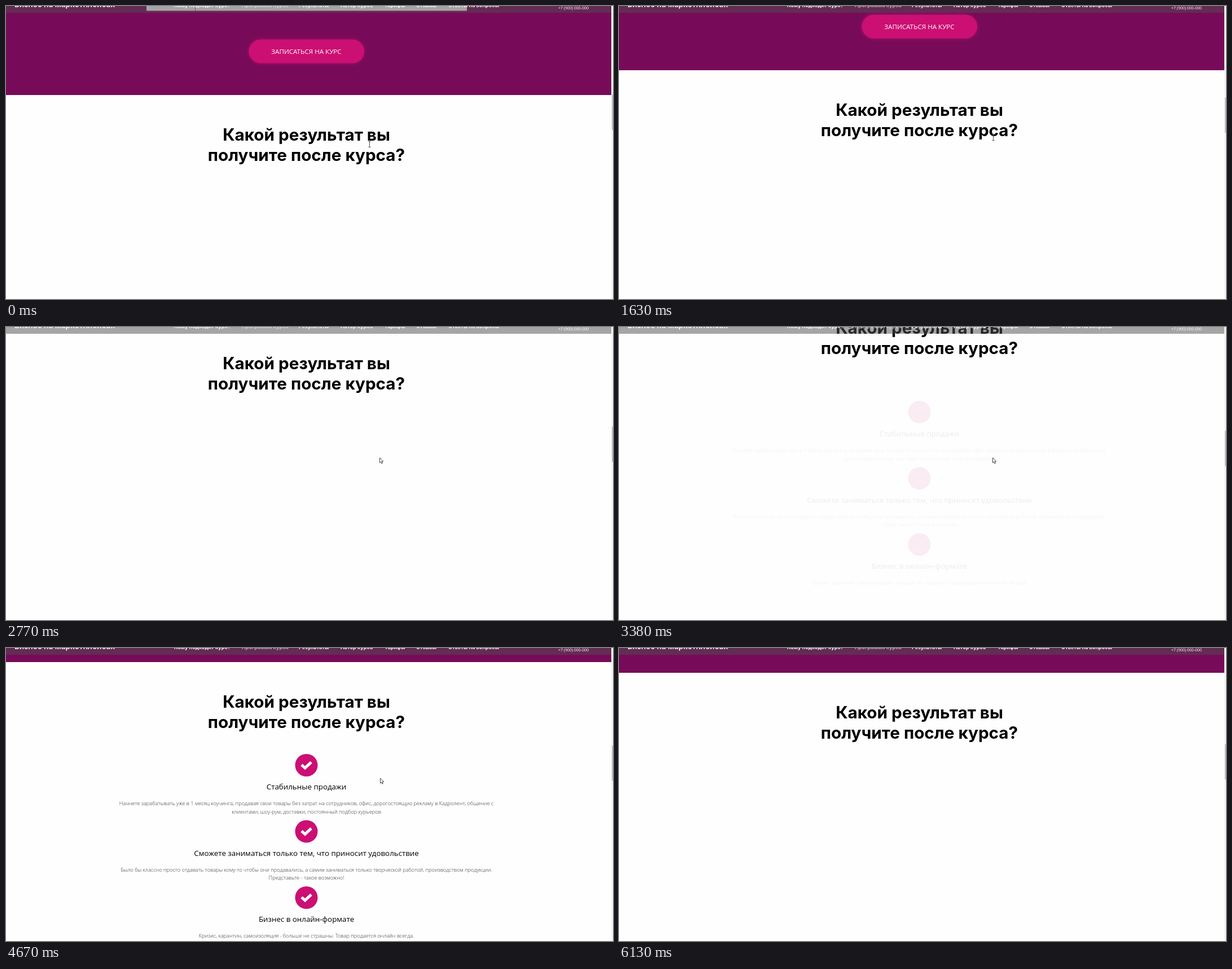
Write an HTML page with a canvas that moves like this. It is 1076x520 px and loops after 6.43 s.

```html
<!DOCTYPE html>
<html lang="ru">
<head>
<meta charset="utf-8">
<style>
  html, body { margin: 0; width: 100%; height: 100%; overflow: hidden; background: #fefefe; }
  canvas { display: block; }
</style>
</head>
<body>
<canvas id="stage" width="1076" height="520"></canvas>
<script>
const ctx = document.getElementById('stage').getContext('2d');
const WIDTH = 1076, HEIGHT = 520, PAGE_WIDTH = 1073, CENTER = 532.5, LOOP = 6430;
const PURPLE = '#780b59', PINK = '#cc0f73';
const SANS = "'Open Sans', 'Noto Sans', sans-serif";
const INTER = "Inter, 'Noto Sans', sans-serif";

// [time, page offset]: wheel notches of about 57 px, each easing out
const SCROLL = [
  [0, 0], [1630, 44], [1780, 57], [2070, 72], [2190, 103], [2340, 113], [2620, 114],
  [2770, 164], [2920, 171], [3230, 218], [3380, 227],
  [4090, 184], [4220, 171], [4670, 133], [4800, 114]
];

// [time, downward shift]: cards fade as they move away from their place
const FADE_DISTANCE = 40;
const CARD_SHIFT = [
  [0, 40], [3380, 37], [3530, 14], [3650, 3.5], [3790, 0.5], [3940, 0],
  [4800, 6.5], [4950, 18], [5080, 33], [5210, 40]
];

// [time, shape, x, y]
const CURSOR = [
  [0, drawBeam, 644.5, 245.5], [450, drawBeam, 646.5, 245.5],
  [590, drawBeam, 659.5, 236.5], [730, drawBeam, 663.5, 233.5],
  [2070, drawArrow, 662.5, 232], [4670, drawArrow, 663.5, 231],
  [5520, drawArrow, 692.5, 242], [5670, null],
  [5820, drawArrow, 1071.5, 508], [5980, drawArrow, 1060.5, 513], [6130, null]
];

const MENU = [
  ['Кому подходит курс?', 298], ['Программа курса', 418], ['Результаты', 519],
  ['Автор курса', 593], ['Тарифы', 671], ['Отзывы', 727], ['Ответы на вопросы', 784]
];

const CARDS = [
  ['Стабильные продажи',
    'Начнете зарабатывать уже в 1 месяц коучинга, продавая свои товары без затрат на сотрудников, офис, дорогостоящую рекламу в Кадролент, общение с',
    'клиентами, шоу-рум, доставки, постоянный подбор курьеров'],
  ['Сможете заниматься только тем, что приносит удовольствие',
    'Было бы классно просто отдавать товары кому-то чтобы они продавались, а самим заниматься только творческой работой, производством продукции.',
    'Представьте - такое возможно!'],
  ['Бизнес в онлайн-формате',
    'Кризис, карантин, самоизоляция - больше не страшны. Товар продается онлайн всегда.']
];

function stepAt(keys, time) {
  let current = keys[0];
  for (const key of keys) if (key[0] <= time) current = key;
  return current;
}

function rect(x, y, w, h, color) {
  ctx.fillStyle = color;
  ctx.fillRect(x, y, w, h);
}

function text(str, x, y, font, color, align = 'center') {
  ctx.font = font;
  ctx.fillStyle = color;
  ctx.textAlign = align;
  ctx.fillText(str, x, y);
}

function polyline(points) {
  ctx.beginPath();
  points.forEach(([x, y]) => ctx.lineTo(x, y));
}

function drawOffer() {
  rect(0, -300, PAGE_WIDTH, 458, PURPLE);
  rect(249, -300, 568, 308.5, '#fefefe');
  rect(335, -300, 1, 308.5, '#d8283c');
  ctx.save();
  ctx.shadowColor = 'rgba(204, 15, 115, .7)';
  ctx.shadowBlur = 6;
  ctx.fillStyle = PINK;
  ctx.beginPath();
  ctx.roundRect(430.5, 59.5, 204.5, 42, 21);
  ctx.fill();
  ctx.restore();
  text('ЗАПИСАТЬСЯ НА КУРС', CENTER, 85, `11.6px ${SANS}`, '#fff');
}

function drawHeading() {
  const font = `700 29.7px ${INTER}`;
  text('Какой результат вы', CENTER, 239, font, '#000');
  text('получите после курса?', CENTER, 275, font, '#000');
}

function drawCard([title, ...lines], y) {
  ctx.save();
  ctx.translate(CENTER, y);
  ctx.fillStyle = PINK;
  ctx.beginPath();
  ctx.arc(0, 0, 20, 0, Math.PI * 2);
  ctx.fill();
  polyline([[-8.6, -0.6], [-2.4, 4.8], [8.6, -5.4]]);
  ctx.strokeStyle = '#fff';
  ctx.lineWidth = 5;
  ctx.stroke();
  text(title, 0, 43, `13.35px ${SANS}`, '#000');
  lines.forEach((line, i) => text(line, 0, 71.3 + i * 14.2, `300 9.23px ${SANS}`, '#333'));
  ctx.restore();
}

function drawHeader() {
  rect(0, 0, PAGE_WIDTH, 12, 'rgba(78, 78, 78, .5)');
  text('Бизнес на маркетплейсах', 15, 2, `600 13.7px ${INTER}`, '#fff', 'left');
  MENU.forEach(([label, x], i) =>
    text(label, x, 2, `700 9.1px ${INTER}`, i === 1 ? 'rgba(255, 255, 255, .6)' : '#fff', 'left'));
  text('+7 (900) 000-000', 979, 6, `7px ${SANS}`, '#fff', 'left');
}

function drawScrollbar(offset) {
  rect(PAGE_WIDTH, 0, WIDTH - PAGE_WIDTH, HEIGHT, '#f3f3f3');
  rect(1074, 157.3 + offset * 0.119, 2, 62.5, '#bdbdbd');
}

function drawBeam() {
  ctx.strokeStyle = '#555';
  ctx.lineWidth = 1;
  ctx.beginPath();
  ctx.moveTo(0, -4.5);
  ctx.lineTo(0, 4.5);
  for (const y of [-5, 5]) {
    ctx.moveTo(-2, y);
    ctx.lineTo(2, y);
  }
  ctx.stroke();
}

function drawArrow() {
  polyline([[0, 0], [0, 9], [2, 7.2], [3.4, 10.3], [4.8, 9.7], [3.5, 6.6], [6.2, 6.4]]);
  ctx.closePath();
  ctx.fillStyle = '#fff';
  ctx.fill();
  ctx.strokeStyle = '#333';
  ctx.lineWidth = 0.9;
  ctx.stroke();
}

function render(time) {
  const offset = stepAt(SCROLL, time)[1];
  const shift = stepAt(CARD_SHIFT, time)[1];
  const [, shape, x, y] = stepAt(CURSOR, time);

  rect(0, 0, WIDTH, HEIGHT, '#fefefe');
  ctx.save();
  ctx.translate(0, -offset);
  drawOffer();
  drawHeading();
  ctx.globalAlpha = 1 - shift / FADE_DISTANCE;
  CARDS.forEach((card, i) => drawCard(card, 341 + shift + i * 117.5));
  ctx.restore();

  drawHeader();
  drawScrollbar(offset);
  if (shape) {
    ctx.save();
    ctx.translate(x, y);
    shape();
    ctx.restore();
  }
}

const start = performance.now();
function tick() {
  render((performance.now() - start) % LOOP);
  requestAnimationFrame(tick);
}
tick();
</script>
</body>
</html>
```
